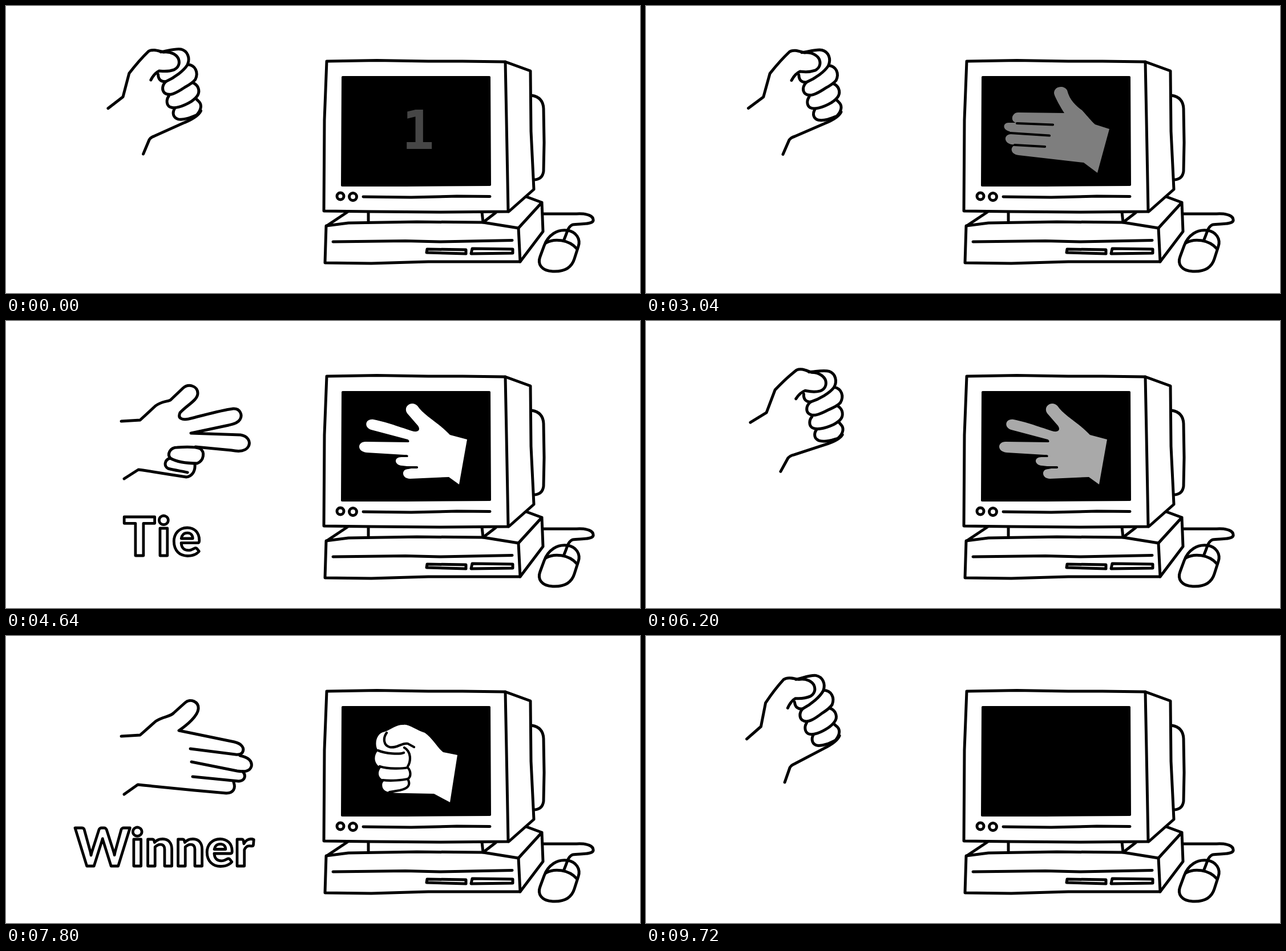
Recreate the animation shown at these times as an HTML page. Size 1111 by 504 pixels, loop 9.8 s.

```html
<!DOCTYPE html>
<html lang="en">
<head>
<meta charset="utf-8">
<title>Rock, paper, scissors</title>
<style>
  html, body { margin: 0; width: 100%; height: 100%; overflow: hidden; background: #fff; }
  svg { display: block; width: 100vw; height: 100vh; }
  .ink { fill: none; stroke: #000; stroke-width: 5; stroke-linecap: round; stroke-linejoin: round; }
  .count { font: bold 95px "DejaVu Sans Mono", monospace; fill: #fff; text-anchor: middle; }
  .word { font: 800 90px Lato, sans-serif; fill: #fff; stroke-width: 4.8; text-anchor: middle; }
  .lit { fill: #fff; }
  .slit { fill: none; stroke: #000; stroke-width: 4.2; stroke-linecap: round; stroke-linejoin: round; }
</style>
</head>
<body>
<svg viewBox="0 0 1111 504">
  <g class="ink">
    <!-- monitor -->
    <path d="M562 97L650 95.500L740 97L800 97L875 98L877 200L880 361L760 362L640 361L557 360L558 200Z"/>
    <path d="M875 98L919 114L920 220L925 322L881 361"/>
    <path d="M921 157Q941 160 942 180L943 240L942 290Q940 305 925 305"/>
    <path d="M590 125L847 125L848 314L700 315L589 315Z" fill="#000" stroke-width="4"/>
    <circle cx="586" cy="334" r="6"/><circle cx="608" cy="335" r="6.500"/>
    <path d="M626 335L710 336L790 334L848 334.500"/>
    <!-- base -->
    <path d="M635 362V380M834 362L836 380L858 363M598 362L562 386"/>
    <path d="M561 386L600 381L720 379L836 380L898 390L901 449L740 449L640 452L559 451Z"/>
    <path d="M912 335L939 345L898 390M939 345L941 396L901 449"/>
    <path d="M573 414L700 412.500L760 414L887 411.500"/>
    <path d="M738 427L806 428L806 435L737 433ZM817 426L888 427V434L815 435Z"/>
    <!-- mouse -->
    <path d="M942 365L1000 365C1020 364 1030 369 1029 377C1027 384 1005 382 993 384C985 387 984 396 978 410"/>
    <path d="M943 421C950 402 966 392 983 394C1000 396 1007 410 1003 422L996 444C991 460 978 467 958 466C938 465 931 453 936 440Z"/>
    <path d="M946 416C960 408 986 409 1001 427"/>
  </g>

  <g id="screen">
    <text class="count" id="count" x="722" y="251"></text>
    <g id="screen-paper">
      <path class="lit" d="M812 216L791 293L767 275L653 262C636 260 638 244 650 244L640 243C626 240 627 225 640 225L637 220C623 217 626 204 636 205L648 205C637 201 642 187 652 187L733 188C728 180 716 160 715 153C715 141 732 138 738 148C742 165 754 176 764 183C775 195 780 202 787 208Z"/>
      <path class="slit" d="M650 206L713 208.500M638 223L707 227.500M646 244L699 247"/>
    </g>
    <g id="screen-scissors">
      <path class="lit" d="M808 208L794 287L776 274L708 277C693 277 692 260 705 260L721 257L694 254C680 253 679 239 693 239L704 239C706 235 703 235 698 235L632 231C614 229 616 212 630 212L705 213C708 212 706 209 704 208L640 191C626 186 630 171 644 173C670 178 700 190 715 194C724 195 726 190 722 184L703 162C695 150 711 139 721 149C732 166 760 180 778 200Z"/>
      <path class="slit" d="M698 257L720 257"/>
    </g>
    <g id="screen-rock">
      <path class="lit" d="M791 209L778 292L750 277L700 276Q672 276 665 272C657 267 658 256 664 254C652 250 650 240 657 231C645 225 643 211 652 201C645 192 648 170 664 168C675 164 685 155 697 156C705 154 720 166 734 170C748 180 755 195 766 204Z"/>
      <path class="slit" d="M667 170C660 180 662 192 672 195C685 198 693 187 704 189L715 195M652 201C665 207 690 208 697 205M698 196C710 203 710 219 704 229M655 229C670 234 695 233 704 231C710 238 710 247 704 251M660 253C675 255 695 253 704 251C710 262 704 268 690 271L672 274"/>
    </g>
  </g>

  <g class="ink">
    <g id="hand-rock">
      <path d="M203 177L236 175L268 147Q295 138 318 134C328 135 333 144 339 150C352 157 355 168 354 174C352 183 345 187 337 186C325 183 319 177 314 173C306 172 300 174 293 178"/>
      <path d="M335 147C345 152 360 156 367 163C375 172 372 185 361 192C350 197 330 198 313 195C306 191 304 185 309 177"/>
      <path d="M313 195C303 197 299 204 300 210C303 220 315 222 335 222C345 223 352 223 358 221C370 214 372 200 362 192"/>
      <path d="M303 219C295 222 291 230 294 236C298 243 312 248 330 249C345 249 352 245 354 235C355 229 353 226 351 223"/>
      <path d="M299 243C291 247 288 255 294 262C303 270 315 272 325 274C340 270 343 262 341 255L340 250"/>
      <path d="M209 278L232 263Q237 261 243 263L300 273Q325 278 335 272"/>
    </g>
    <g id="hand-paper">
      <path d="M202 176L235 174L262 150C275 141 288 142 294 135L314 117C323 109 338 115 337 128C336 140 318 156 303 166L400 186C413 189 419 197 414 205C411 208 408 209 402 208L323 198"/>
      <path d="M410 210C425 213 432 220 430 229C427 238 418 239 405 237L325 221"/>
      <path d="M415 238C421 245 419 254 408 255L327 247"/>
      <path d="M399 257C403 268 398 276 386 276L330 271L240 262L231 261L207 278"/>
    </g>
    <g id="hand-scissors">
      <path d="M202 176L235 174L262 149C273 141 281 142 288 139L310 118C320 109 336 114 336 127C336 139 318 147 305 161C300 172 310 174 320 172C345 166 375 157 398 154C410 153 415 165 410 173C406 180 395 182 390 183L324 197L411 200C424 202 429 212 425 220C420 230 405 229 395 227L332 221"/>
      <path d="M300 222C287 222 282 234 288 241C300 248 320 250 335 250C347 245 349 230 340 224Q330 220 300 222Z"/>
      <path d="M288 241C278 243 276 255 284 259C295 262 310 264 318 266"/>
      <path d="M331 252C332 265 325 273 316 274L290 270L240 262L232 261L207 277"/>
    </g>
    <text class="word" id="word"></text>
  </g>
</svg>

<script>
const LOOP = 9800, LEAD = 40;
const BOB = 400, REVEAL = 1000, RISE = 350, PEAK = 38;
const rounds = [
  { start: 0,    end: 3180, fade: 220, hand: "rock",     screen: "paper",    word: "Loser",  x: 279, y: 411, size: 87, gap: 0, pop: 1.4 },
  { start: 3180, end: 6380, fade: 220, hand: "scissors", screen: "scissors", word: "Tie",    x: 275, y: 412, size: 93, gap: 3, pop: 1.25 },
  { start: 6380, end: LOOP, fade: 320, hand: "paper",    screen: "rock",     word: "Winner", x: 278, y: 404, size: 92, gap: 1, pop: 1.2 }
];
const shapes = ["rock", "paper", "scissors"];
const el = id => document.getElementById(id);
const clamp = v => Math.max(0, Math.min(1, v));
const ease = v => (1 - Math.cos(Math.PI * clamp(v))) / 2;

function show(prefix, name) {
  for (const s of shapes) el(prefix + s).style.display = s === name ? "" : "none";
}

// Grows past full size, then settles.
function popScale(age, pop) {
  return age < 120 ? pop * ease(age / 120) : pop + (1 - pop) * ease((age - 120) / 160);
}

function drawHand(hand, angle) {
  show("hand-", hand);
  el("hand-" + hand).setAttribute("transform", `rotate(${-angle} 195.3 217.6)`);
}

function drawWord(round, age) {
  const word = el("word"), { x, y } = round;
  word.textContent = round.word;
  word.style.fontSize = round.size + "px";
  word.style.letterSpacing = round.gap + "px";
  const middle = y - 32;
  word.setAttribute("transform", `translate(${x} ${middle}) scale(${popScale(age, round.pop)})`);
  word.setAttribute("y", y - middle);
}

function render(now) {
  const time = (now + LEAD) % LOOP;
  const round = rounds.find(r => time < r.end);
  const t = time - round.start, length = round.end - round.start;
  const counting = t < REVEAL, riseAt = length - RISE - 20;
  const rising = t >= riseAt;

  if (counting) drawHand("rock", PEAK * (1 + Math.cos(2 * Math.PI * t / BOB)) / 2);
  else if (rising) drawHand("rock", PEAK * ease((t - riseAt) / RISE));
  else drawHand(round.hand, 0);

  const wordOn = t >= REVEAL + 40 && !rising;
  el("word").style.display = wordOn ? "" : "none";
  if (wordOn) drawWord(round, t - REVEAL - 40);

  el("count").textContent = counting ? 1 + Math.floor(t / BOB) : "";
  show("screen-", counting ? "" : round.screen);
  el("screen").style.opacity = counting
    ? clamp((t % BOB) / 150)
    : clamp(1 - (t - length + round.fade) / 240);
}

const begin = performance.now();
function tick() {
  render(performance.now() - begin);
  requestAnimationFrame(tick);
}
tick();
</script>
</body>
</html>
```
